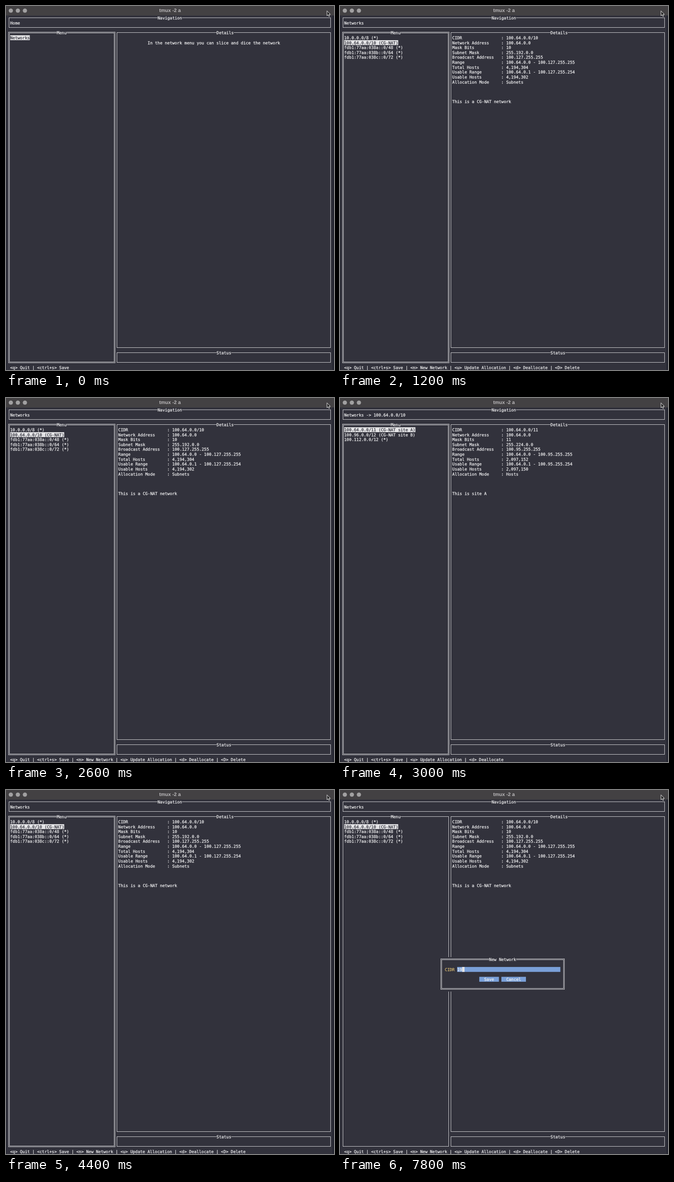
Recreate the animation shown at these times as an HTML page. Size 711 by 788 pixels, loop 8000 ms.

```html
<!DOCTYPE html>
<html lang="en">
<head>
<meta charset="utf-8">
<title>Network menu</title>
<style>
  html, body { margin: 0; width: 711px; height: 788px; overflow: hidden; background: #32323c; }
  svg { display: block; }
  text { white-space: pre; text-rendering: geometricPrecision; }
  .cell { font: 8.845px "DejaVu Sans Mono", monospace; stroke-width: .25px; }
  .title { font: bold 10.7px "Liberation Sans", sans-serif; }
</style>
</head>
<body>
<svg id="stage" width="711" height="788" viewBox="0 0 711 788">
  <path fill="#252631" d="M0 20H1.5V788H0zM707.5 20H711V788H707.5z"/>
  <rect width="711" height="20.5" fill="#434143"/>
  <g fill="#a1a0a1"><circle cx="10.5" cy="10" r="4.6"/><circle cx="25.7" cy="10" r="4.6"/><circle cx="41" cy="10" r="4.6"/></g>
  <text class="title" x="355.5" y="13.3" text-anchor="middle" fill="#b9b7b9">tmux -2 a</text>
  <g id="screen"></g>
  <path d="M695.8 10.5v10.6l2.4-2.2 1.7 3.8 1.8-.8-1.7-3.7h3.2z" fill="#222" stroke="#e8e8e8" stroke-width="1"/>
</svg>
<script>
const COL = 5.325, ROW = 10.66, BG = '#32323c', FG = '#f2f2f3', LINE = '#cbcbce',
      LIGHT = '#e4e4e6', BLUE = '#7aa0d8', YELLOW = '#d9bb72';

// Terminal grid: left edge of a column, middle of a row
const px = col => 3.7 + col * COL;
const py = row => 26 + row * ROW;
const escape = s => s.replace(/&/g, '&amp;').replace(/</g, '&lt;');

const fill = (col, row, cols, rows, color) =>
  `<rect x="${px(col)}" y="${py(row - .5)}" width="${cols * COL}" height="${rows * ROW}" fill="${color}"/>`;

const text = (col, row, s, color = FG) =>
  `<text class="cell" x="${px(col)}" y="${py(row) + 3.2}" fill="${color}" stroke="${color}">${escape(s)}</text>`;

const label = (col, row, s, back, color) => fill(col, row, s.length, 1, back) + text(col, row, s, color);

// Lines sit on whole pixels
const lineX = col => Math.floor(px(col + .5)) + .5;
const lineY = row => Math.round(py(row)) - .5;

function box(c0, r0, c1, r1, titleCol, title, double) {
  const x = lineX(c0), y = lineY(r0), w = lineX(c1) - x, h = lineY(r1) - y;
  const frame = d =>
    `<rect x="${x - d}" y="${y - d}" width="${w + 2 * d}" height="${h + 2 * d}" fill="none" stroke="${LINE}"/>`;
  return (double ? frame(-1) + frame(1) : frame(0)) + label(titleCol, r0, title, BG, FG);
}

const table = rows => rows.map(([key, value]) => key.padEnd(20) + ': ' + value);

function details4(cidr, mode, note = '') {
  const [address, bits] = cidr.split('/');
  const first = address.split('.').reduce((n, part) => n * 256 + +part, 0);
  const size = 2 ** (32 - bits), last = first + size - 1;
  const ip = n => [24, 16, 8, 0].map(shift => n >>> shift & 255).join('.');
  return [...table([
    ['CIDR', cidr],
    ['Network Address', address],
    ['Mask Bits', bits],
    ['Subnet Mask', ip(2 ** 32 - size)],
    ['Broadcast Address', ip(last)],
    ['Range', `${address} - ${ip(last)}`],
    ['Total Hosts', size.toLocaleString('en-US')],
    ['Usable Range', `${ip(first + 1)} - ${ip(last - 1)}`],
    ['Usable Hosts', (size - 2).toLocaleString('en-US')],
    ['Allocation Mode', mode],
  ]), '', '', '', note];
}

const details6 = table([
  ['CIDR', 'fdb1:77aa:038a::0/48'],
  ['Network Address', 'fdb1:77aa:38a::'],
  ['Mask Bits', '48'],
  ['Subnet Mask', 'ffff:ffff:ffff::'],
  ['Range', 'fdb1:77aa:38a:: - fdb1:77aa:38a:ffff:ffff:ffff:ffff:ffff'],
  ['Total /64 Networks', '65,536'],
  ['Allocation Mode', 'Unallocated'],
]);

const quit = '<q> Quit | <ctrl+s> Save';
const create = ' | <n> New Network', remove = ' | <D> Delete';
const free = ' | <a> Allocate Subnets | <A> Allocate Hosts | <s> Split';
const used = ' | <u> Update Allocation | <d> Deallocate';

const networks = ['10.0.0.0/8 (*)', '100.64.0.0/10 (CG-NAT)', 'fdb1:77aa:038a::0/48 (*)',
                  'fdb1:77aa:038b::0/64 (*)', 'fdb1:77aa:038c::0/72 (*)'];
const sites = ['100.64.0.0/11 (CG-NAT site A)', '100.96.0.0/12 (CG-NAT site B)', '100.112.0.0/12 (*)'];

const view = (nav, menu, selected, details, footer) => ({ nav, menu, selected, details, footer });
const listView = (...args) => view('Networks', networks, ...args);
const siteView = (...args) => view('Networks -> 100.64.0.0/10', sites, ...args);

const home = view('Home', ['Networks'], 0,
  ['', ' '.repeat(12) + 'In the network menu you can slice and dice the network'], quit);
const cgnat = listView(1, details4('100.64.0.0/10', 'Subnets', 'This is a CG-NAT network'), quit + create + used + remove);

const timeline = [
  [0, home],
  [200, listView(0, details4('10.0.0.0/8', 'Unallocated'), quit + create + free + remove)],
  [1200, cgnat],
  [1600, listView(2, details6, quit + create + free + remove)],
  [2600, cgnat],
  [3000, siteView(0, details4('100.64.0.0/11', 'Hosts', 'This is site A'), quit + used)],
  [3400, siteView(1, details4('100.96.0.0/12', 'Hosts', 'This is site B'), quit + used)],
  [3600, siteView(2, details4('100.112.0.0/12', 'Unallocated'), quit + free)],
  [4000, { ...cgnat, footer: quit + free }],
  [4200, cgnat],
  [6800, { ...cgnat, input: '' }],
  [7600, { ...cgnat, input: '1' }],
  [7800, { ...cgnat, input: '19' }],
];

const dialog = input =>
  fill(40, 32, 51, 7, BG) + box(40, 32, 90, 38, 60, 'New Network', true) +
  text(42, 34, 'CIDR', YELLOW) + fill(47, 34, 42, 1, BLUE) + text(47, 34, input) +
  fill(47 + input.length, 34, 1, 1, LIGHT) +
  label(56, 36, '  Save  ', BLUE) + label(65, 36, '  Cancel  ', BLUE);

function draw({ nav, menu, selected, details, footer, input }) {
  const open = input !== undefined;
  return box(0, 0, 131, 2, 61, 'Navigation') + text(1, 1, nav) +
    box(0, 3, 43, 70, 20, 'Menu', !open) +
    menu.map((s, i) => i === selected ? label(1, 4 + i, s, LIGHT, BG) : text(1, 4 + i, s)).join('') +
    box(44, 3, 131, 67, 85, 'Details') +
    details.map((s, i) => text(45, 4 + i, s)).join('') +
    box(44, 68, 131, 70, 85, 'Status') + text(1, 71, footer) +
    (open ? dialog(input) : '');
}

const screenGroup = document.getElementById('screen');
let shown;
function tick() {
  const t = performance.now() % 8000;
  const [, state] = timeline.findLast(([start]) => start <= t);
  if (state !== shown) screenGroup.innerHTML = draw(shown = state);
  requestAnimationFrame(tick);
}
tick();
</script>
</body>
</html>
```
